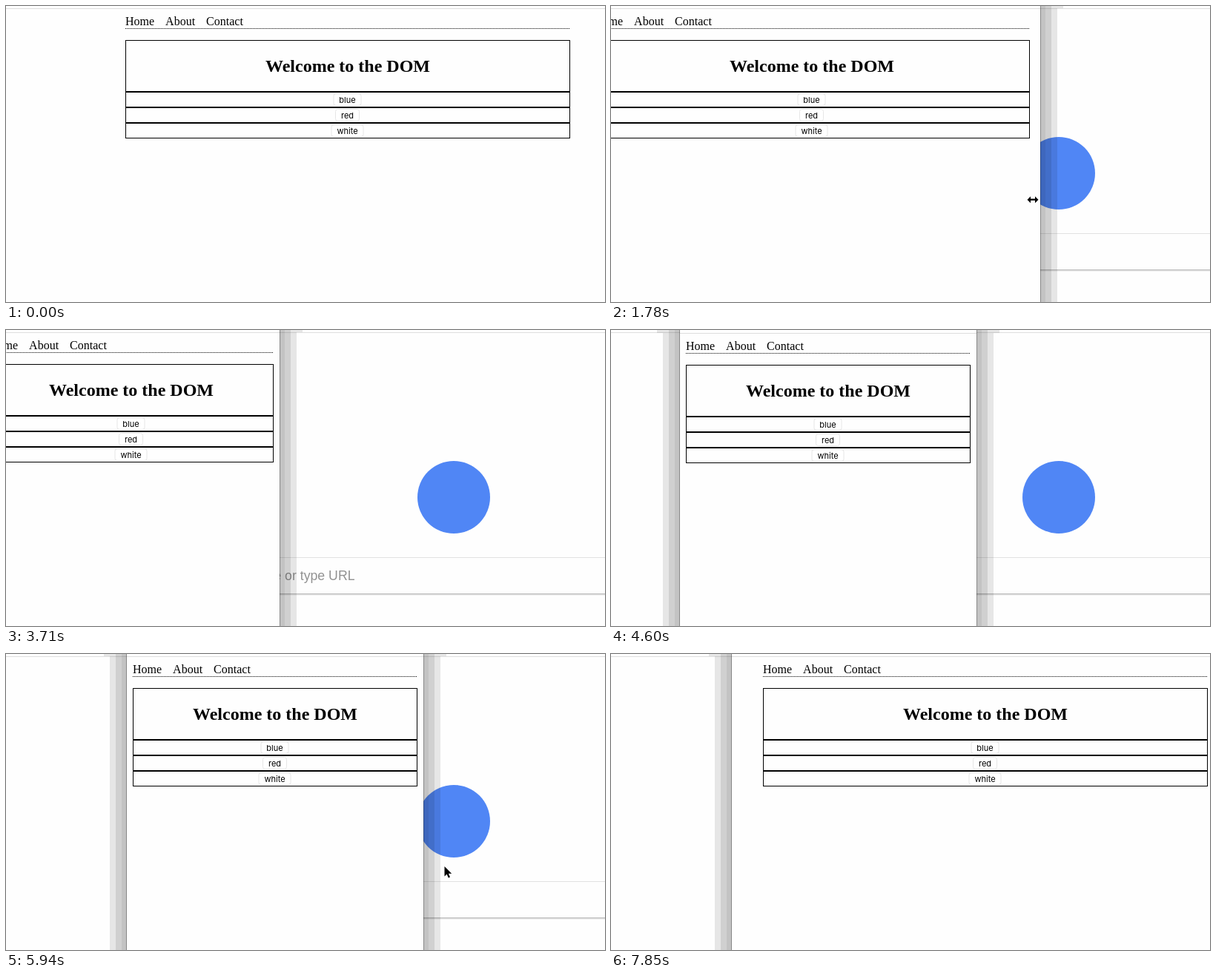
Write an HTML page that moves like this. It is 808 px wide and 400 px high and loops after 7.99 s.

```html
<!DOCTYPE html>
<html lang="en">
<head>
<meta charset="utf-8">
<title>Resizing a window</title>
<style>
  html, body { margin: 0; width: 100%; height: 100%; overflow: hidden; background: #fefefe; }
  svg { display: block; width: 808px; height: 400px; }
  .serif { font-family: "Liberation Serif", "Times New Roman", serif; fill: #000; }
  .label { font: 11px Inter, sans-serif; fill: #000; text-anchor: middle; }
  .hint { font: 17.7px "Liberation Sans", Arial, sans-serif; fill: #929292; text-anchor: end; }
  .box { fill: none; stroke: #000; }
  .button { fill: #fff; stroke: #e6e6e6; }
</style>
</head>
<body>
<svg id="stage" viewBox="0 0 808 400"></svg>
<script>
const LOOP = 7990;
const stage = document.getElementById("stage");

function set(el, attrs) {
  for (const name in attrs) el.setAttribute(name, attrs[name]);
}

function add(parent, tag, attrs, text) {
  const el = document.createElementNS("http://www.w3.org/2000/svg", tag);
  set(el, attrs);
  if (text) el.textContent = text;
  parent.appendChild(el);
  return el;
}

const fillRect = (parent, x, y, width, height, fill, opacity = 1) =>
  add(parent, "rect", { x, y, width, height, fill, opacity, "shape-rendering": "crispEdges" });

const move = (el, x, y) => el.setAttribute("transform", `translate(${x} ${y})`);
const show = (el, on) => { el.style.display = on ? "" : "none"; };
const mix = (a, b, p) => a + (b - a) * p;

// Page behind the window
fillRect(stage, 0, 0, 808, 400, "#fefefe");
fillRect(stage, 0, 3, 808, 1, "#dedede");
add(stage, "circle", { cx: 604, cy: 226, r: 49, fill: "#5086f5" });
fillRect(stage, 245, 307, 563, 1, "#e2e2e2");
["#bdbdbd", "#dcdcdc", "#f2f2f2"].forEach((tone, i) =>
  fillRect(stage, 245, 356 + i, 563, 1, tone));
add(stage, "text", { x: 470.5, y: 338, class: "hint" }, "Search Tivole or type URL");

// Stepped shadow, drawn outward from an edge
function shadow(parent, side) {
  const g = add(parent, "g", {});
  const band = (from, to, height, opacity) =>
    fillRect(g, side > 0 ? from : -to, -10, to - from, height, "#000", opacity);
  band(0, 7, 420, 0.23);
  band(7, 15, 420, 0.18);
  band(15, 23, 420, 0.095);
  band(23, 31, 13, 0.095);
  band(0, 1, 420, 0.3);
  return g;
}

const win = add(stage, "g", {});
shadow(win, -1);
const rightShade = shadow(win, 1);
const pane = fillRect(win, 0, -10, 400, 420, "#fefefe");
const bar = fillRect(win, 0, 3, 400, 1, "#dedede");

const nav = add(win, "text", { y: 26, class: "serif", "font-size": 16 });
["Home", "About", "Contact"].forEach((word, i) =>
  add(nav, "tspan", { dx: i ? 15 : 0 }, word));
const dots = add(win, "line", { y1: 30.5, y2: 30.5, stroke: "#000", "stroke-dasharray": "1 1" });

const boxes = [46, 116, 137, 158].map((y, i) =>
  add(win, "rect", { y: y + 0.5, height: i ? 20 : 69, class: "box" }));

const middle = add(win, "g", {});
add(middle, "text", {
  y: 89, class: "serif", "font-size": 24, "font-weight": 700, "text-anchor": "middle"
}, "Welcome to the DOM");
["blue", "red", "white"].forEach((word, i) => {
  const y = 118.5 + 21 * i;
  const back = add(middle, "rect", { y, height: 16, rx: 3, class: "button" });
  const label = add(middle, "text", { x: -0.5, y: y + 12.5, class: "label" }, word);
  const w = Math.round(label.getComputedTextLength()) + 15;
  set(back, { x: -w / 2 - 0.5, width: w });
});

// Pointers
const ink = {
  fill: "#000", stroke: "#fff", "stroke-width": 2, "stroke-linejoin": "round", "paint-order": "stroke"
};
const sizer = add(stage, "path", {
  ...ink, d: "M-7.5 0L-3 -4.5V-1.2H3V-4.5L7.5 0L3 4.5V1.2H-3V4.5Z"
});
const arrow = add(stage, "path", {
  ...ink, d: "M.5 1V14.5L3.6 11.6L5.8 16.6L8 15.6L5.9 10.8H10.2Z"
});

// Progress 0..1 in even steps, the first at start and the last at end
function glide(t, start, end, steps, power = 1.5) {
  if (t < start) return 0;
  const k = Math.floor((t - start) / (end - start) * (steps - 1) + 1.001);
  return 1 - (1 - Math.min(k, steps) / steps) ** power;
}

function render(t) {
  const shrink = glide(t, 1190, 2370, 9);
  const pull = glide(t, 2670, 2810, 2);
  const leave = glide(t, 3410, 3710, 3);
  const drag = glide(t, 4600, 4750, 2);
  const enter = glide(t, 5200, 5940, 6);
  const aim = glide(t, 6240, 6670, 4, 1);
  const grow = glide(t, 6970, 7850, 7, 1.2);

  // The page is laid out again before the frame catches up
  const lag = shrink > 0 && shrink < 0.85 ? 6 : 0;
  const dropped = t >= 4600 && t < 5200;
  const left = Math.round(mix(-31, 163, drag)) - (dropped ? 1 : 0);
  const width = Math.round(984 - 540 * shrink - 44 * pull + 284 * grow);
  const inner = Math.min(600, width - 16);
  const x = (width - inner) / 2;
  const right = left + width;

  move(win, left, dropped ? 1 : 0);
  move(rightShade, width + lag, 0);
  set(pane, { width: width + lag });
  set(bar, { width: width + lag });
  set(nav, { x });
  set(dots, { x1: x, x2: x + inner });
  boxes.forEach(box => set(box, { x: x + 0.5, width: inner - 1 }));
  move(middle, width / 2, 0);

  const shrinking = shrink > 0 && !leave;
  const growing = aim > 0.7;
  show(sizer, shrinking || growing);
  if (growing) move(sizer, right + 1, 296);
  else move(sizer, right - 4 - 4 * pull, mix(249, 267, shrink));

  show(arrow, leave && !growing);
  if (enter) {
    const bulge = 40 * Math.sin(Math.PI * enter);
    move(arrow, mix(630, 591, enter) + bulge - 27 * aim, mix(-20, 286, enter));
  } else {
    move(arrow, mix(361, 310, leave), mix(267, -20, leave));
  }
}

const start = performance.now();
function tick() {
  render((performance.now() - start) % LOOP);
  requestAnimationFrame(tick);
}
tick();
</script>
</body>
</html>
```
